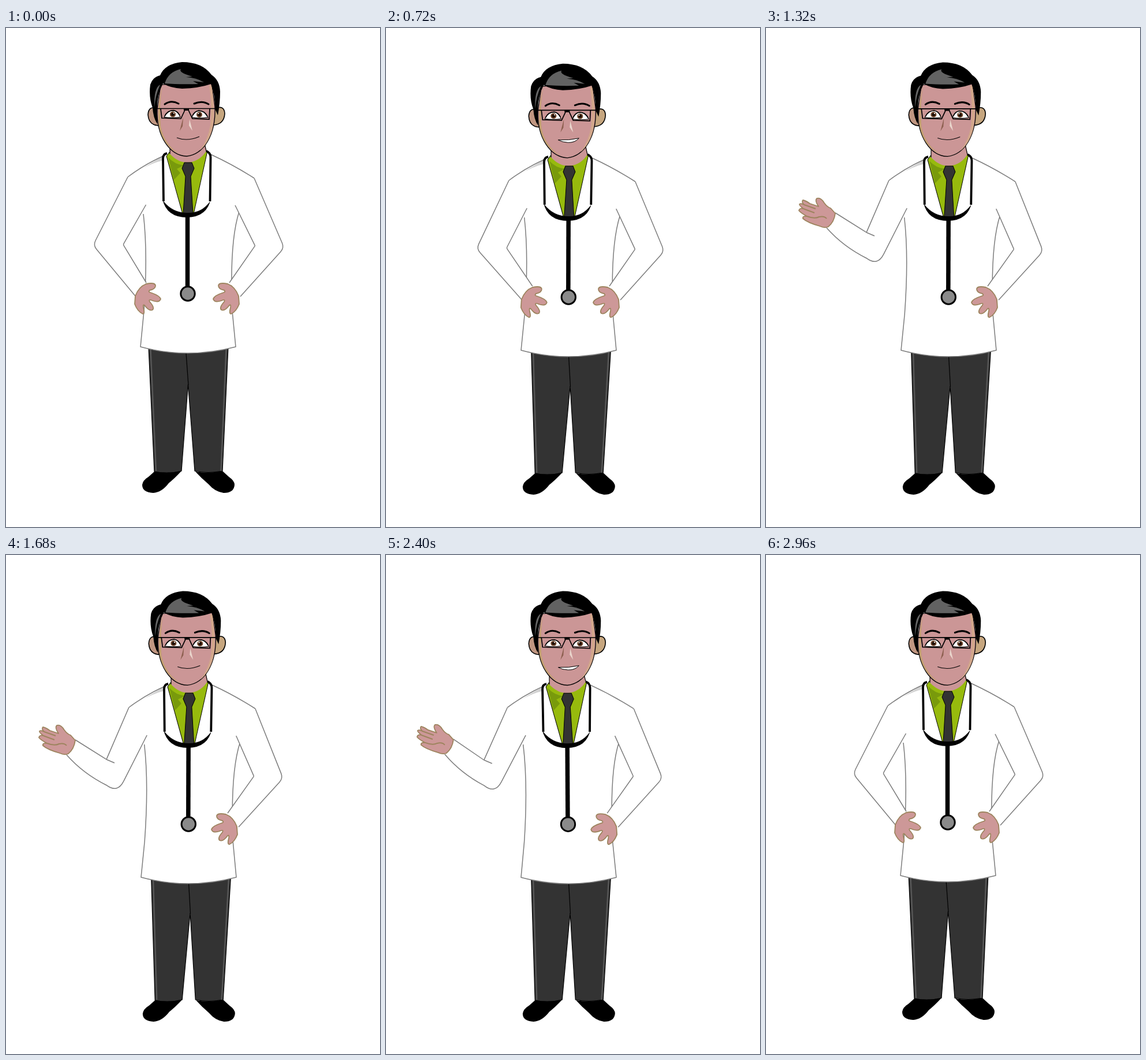
These frames come from a looping animation (648x864 px, 3000 ms). An HTML page:

```html
<!DOCTYPE html>
<html lang="en">
<head>
<meta charset="utf-8">
<title>Doctor</title>
<style>
  html, body { margin: 0; width: 100%; height: 100%; overflow: hidden; background: #fff; }
  svg { display: block; width: 100vw; height: 100vh; }
  .line { fill: none; stroke: #7c7c7c; stroke-width: 1.5; stroke-linejoin: round; }
  .ink { fill: none; stroke: #000; }
  .skin { fill: #cb9696; }
  .hand { fill: #cd9898; stroke: #9d845e; stroke-width: 1.8; stroke-linejoin: round; }
</style>
</head>
<body>
<svg viewBox="0 0 648 864">
  <defs>
    <path id="hip" class="hand" d="M224 464Q230 448 243 443Q258 440 259 446Q259 452 249 454Q246 457 250 458Q266 463 268 469Q266 477 251 471Q247 470 249 474Q258 484 254 488Q248 491 240 480Q237 478 238 484Q241 495 237 495Q228 491 223 478Z"/>
    <g id="eye">
      <path d="M-15 5Q-9-7 1-7Q9-6 13 5Q-1 7-15 5Z" fill="#fff" stroke="#000" stroke-width="1.1"/>
      <circle r="5" fill="#6e452b"/>
      <circle r="2.800" fill="#1a0d06"/>
      <circle cx="1.800" cy="-2" r="1.1" fill="#fff"/>
      <path class="ink" d="M-14 3Q-9-7 1-7Q8-6 12 2" stroke-width="1.7"/>
    </g>
  </defs>

  <g id="legs">
    <path d="M247 552L257 768Q281 773 304 767L315.500 617L327 767Q350 772 375 767L385 552Z" fill="#333" stroke="#000" stroke-width="1.2"/>
    <path d="M250.500 556L260 767M381.500 556L372.500 767" fill="none" stroke="#555" stroke-width="2.500"/>
    <path class="ink" d="M311.500 556L316 618" stroke-width="1.2"/>
    <path d="M257 768Q281 772 304 767Q292 780 282 788Q270 804 255 805Q236 804 236 791Q237 783 247 777Z"/>
    <path d="M328 768Q350 772 375 767L386 777Q396 784 396 791Q395 805 377 805Q362 803 351 790Q338 779 328 768Z"/>
  </g>

  <g id="torso">
    <path d="M211 258L272 221H355L430 260L404 318Q388 370 392 495L398 552Q315 574 233 552L239 495Q246 390 238 322Z" fill="#fff"/>
    <path d="M222 252L273 221V229Q248 235 222 252Z" fill="#d2d2d2"/>
    <path class="line" d="M211 258Q240 236 274 221M355 219Q394 237 430 260M238 322Q246 390 239 490L233 552Q315 574 398 552L392 490Q387 370 404 318"/>
    <path d="M283 215L278 222L306 322H325L349 213Z" fill="#97ba0d" stroke="#000"/>
    <path d="M281 224Q292 236 308 238L296 244L302 251L291 263Z" fill="#799a0c"/>
    <path class="skin" d="M284 190V218Q298 233 315 233Q336 231 347 213L343 190Z"/>
    <path class="ink" d="M284 198V218M343.500 198L347 213" stroke-width="1.2"/>
    <path d="M309 233H322L326 243L320 257L324 322H307L311 257L305 243Z" fill="#333" stroke="#000"/>
    <path class="ink" d="M279 217Q272 218 272 226L273 300M347 213Q354.500 216 354.500 224L353.500 300" stroke-width="3.800"/>
    <path d="M271 296Q278 328 314 328Q349 327 355 295L353 301Q338 321 314 320Q289 320 273 300Z"/>
    <path class="ink" d="M314.500 324V450" stroke-width="7.500"/>
    <circle cx="315" cy="460" r="12.200" fill="#8a8a8a" stroke="#000" stroke-width="3"/>
  </g>

  <g>
    <path id="sleeveL" fill="#fff"/><path id="seamL" class="line"/>
    <use id="hipL" href="#hip"/>
    <g id="open">
      <path class="hand" d="M120 321Q118 336 108 344Q102 347 93 343Q72 337 64 330Q63 325 71 326Q60 320 57 316Q58 311 65 313Q57 307 58 305Q61 303 66 306Q61 301 64 298Q69 299 76 304L91 309Q84 299 88 295Q95 293 101 303Q106 310 112 312Z" stroke-width="2.400"/>
      <path d="M71 326Q84 331 92 327Q101 325 105 330M65 313L84 320M66 306L86 313" fill="none" stroke="#9d845e" stroke-width="2"/>
    </g>
    <path id="sleeveR" fill="#fff"/><path id="seamR" class="line"/>
    <use id="hipR" href="#hip"/>
  </g>

  <g id="head">
    <g stroke="#000" stroke-width="1.6">
      <path d="M264 140Q247 133 246 150Q247 168 264 169Z" fill="#c09681"/>
      <path d="M360 140Q378 132 379 148Q378 167 359 168Z" fill="#c6a67f"/>
      <path class="skin" d="M268 98L262 140C260 188 284 221 313 222C342 219 364 186 362 136L356 94Z" stroke-width="1.3"/>
    </g>
    <path d="M271 100Q261 140 265 170Q272 205 302 219Q274 202 268 170Q265 130 271 100Z" fill="#c2a06e"/>
    <path d="M356 98Q363 140 358 173Q352 198 336 212Q350 193 354 168Q358 134 352 100Z" fill="#d2a78b"/>
    <path d="M262 166Q255 155 254 138Q247 120 250 98Q254 85 267 82Q275 62 305 59Q340 59 356 81Q370 90 371 110Q371 130 367 151L362 140Q362 115 355 97Q335 104 305 105Q285 104 272 96Q262 115 262 138Z"/>
    <path d="M275 96Q281 76 303 71Q298 77 323 84L312 85Q330 86 343 94L324 92L333 97Q300 98 275 96Z" fill="#626262"/>
    <path d="M267 98Q256 104 257 137Q259 116 267 98Z" fill="#666"/>
    <path class="ink" d="M275 132Q286 124 299 131M326 131Q340 125 351 132" stroke-width="3" stroke-linecap="round"/>
    <path d="M307 155L301 178L306 170Z" fill="#8c5f4f"/>
    <path d="M318 158L323 178L317 169Z" fill="#ead6cd"/>
    <use id="eyeL" href="#eye"/><use id="eyeR" href="#eye"/>
    <path class="ink" d="M258 139.500H368M268 140L270 156L303 157L310 142H316L323 157L352 158L353 140" stroke-width="1.7"/>
    <path class="ink" d="M308 141H317" stroke-width="4"/>
    <path id="smile" class="ink" d="M296 190Q314 197 335 188" stroke-width="1.1"/>
    <path id="grin" d="M297 191Q316 192 333 188Q326 196 314 195.500Q304 195 297 191Z" fill="#fff" stroke="#000"/>
  </g>
</svg>
<script>
const $ = id => document.getElementById(id);
const set = (id, name, value) => $(id).setAttribute(name, value);
const show = (id, on) => set(id, 'visibility', on ? 'visible' : 'hidden');

const clamp = x => Math.min(1, Math.max(0, x));
const ease = x => x * x * (3 - 2 * x);
const ramp = (t, a, b) => ease(clamp((t - a) / (b - a)));
const bump = (t, peak, reach) => Math.cos(Math.PI / 2 * clamp(Math.abs(t - peak) / reach)) ** 2;

const mix = (a, b, k) => a.map((v, i) => v + (b[i] - v) * k);
const add = (a, b) => [a[0] + b[0], a[1] + b[1]];
const sub = (a, b) => [a[0] - b[0], a[1] - b[1]];
const mid = (a, b) => mix(a, b, .5);
const polygon = points => `M${points.join('L')}Z`;

// How strongly each gesture acts at time t.
function gestures(t) {
  const step = ramp(t, 440, 680) * (1 - ramp(t, 2400, 2960));
  const settle = ramp(t, 320, 640);
  const flare = bump(t, 310, 220);
  const dip = bump(t, 2200, 220);
  return {
    step, settle, flare, dip,
    nod: bump(t, 1060, 400),
    pull: bump(t, 740, 220),
    sway: bump(t, 2160, 500),
    raise: ramp(t, 740, 1160) * (1 - ramp(t, 2440, 2860)),
    drop: 3 * settle + 3 * step - 3 * flare + 9 * dip
  };
}

// Shift the top and the bottom of a part by different amounts.
function lean(y0, y1, d0, d1, dy) {
  const slope = (d1 - d0) / (y1 - y0), shift = d0 - slope * y0;
  return {
    matrix: `matrix(1 0 ${slope} 1 ${shift} ${dy})`,
    at: ([x, y]) => [x + slope * y + shift, y + dy]
  };
}

function swing(a, b, k) {
  const angleA = Math.atan2(a[1], a[0]);
  let turn = Math.atan2(b[1], b[0]) - angleA;
  if (turn < 0) turn += 2 * Math.PI;
  const length = Math.hypot(...a) + (Math.hypot(...b) - Math.hypot(...a)) * k;
  const angle = angleA + turn * k;
  return [Math.cos(angle) * length, Math.sin(angle) * length];
}

// A bent seam with a rounded elbow and a slightly bowed forearm.
function bend(from, elbow, to, radius, bow = 0) {
  const toward = p => mix(elbow, p, Math.min(.45, radius / Math.hypot(...sub(p, elbow))));
  const start = toward(to), belly = add(mid(start, to), [-bow, bow]);
  return `M${from}L${toward(from)}Q${elbow} ${start}Q${belly} ${to}`;
}

function armPose([outer, inner, w0, w1], elbow, wrist) {
  const pose = [add(outer, elbow), add(inner, elbow), add(w0, wrist), add(w1, wrist)];
  const pivot = mid(pose[0], pose[1]);
  return { outer: pose[0], inner: pose[1], pivot, reach: [sub(pose[2], pivot), sub(pose[3], pivot)] };
}

function drawLeftArm(g, body) {
  const k = g.raise;
  const low = armPose([[151, 376], [203, 375], [224, 464], [243, 441]],
    [6 * g.pull - 17 * g.flare, g.drop], [11 * g.pull - 3 * g.flare, g.drop - 9 * g.flare]);
  const high = armPose([[174, 354], [193, 413], [120, 320], [105, 346]],
    [-8 * g.sway, 2 * g.sway], [-6 * g.sway, -2 * g.sway]);
  const outer = mix(low.outer, high.outer, k), inner = mix(low.inner, high.inner, k);
  const [w0, w1] = low.reach.map((r, i) => add(mid(outer, inner), swing(r, high.reach[i], k)));
  const shoulder = body.at([211, 258]), armpit = body.at([242.5, 306]);

  set('sleeveL', 'd', polygon([shoulder, outer, w0, w1, inner, armpit]));
  set('seamL', 'd', bend(shoulder, outer, w0, 9 - 8 * k) +
    bend(armpit, inner, w1, 2 + 22 * k, 6 * k) +
    `M${outer}L${add(outer, [14 * k, 6 * k])}`);

  const place = (x, y, angle) =>
    `translate(${mid(w0, w1)}) rotate(${angle}) translate(${-x} ${-y})`;
  set('hipL', 'transform', place(233.5, 452.5, 158 * k));
  set('open', 'transform', place(112.5, 333, 158 * (k - 1)));
  show('hipL', k < .5);
  show('open', k >= .5);
}

function drawRightArm(g, body) {
  const elbow = [14 * g.flare - 2 * g.raise - 2 * g.sway, g.drop];
  const wrist = [-9 * g.flare - 3 * g.raise - 1.5 * g.sway, g.drop - 18 * g.flare];
  const outer = add([482, 380.5], elbow), inner = add([431.5, 377], elbow);
  const w0 = add([406, 465], wrist), w1 = add([387, 441], wrist);
  const shoulder = body.at([430, 260]), armpit = body.at([397, 307]);

  set('sleeveR', 'd', polygon([shoulder, outer, w0, w1, inner, armpit]));
  set('seamR', 'd', bend(shoulder, outer, w0, 9) + bend(armpit, inner, w1, 1));
  set('hipR', 'transform', `translate(${627 + wrist[0]} ${wrist[1]}) scale(-1 1)`);
}

function drawHead(t, g) {
  const y = 3.4 * g.settle - 4 * g.flare - 11 * g.nod + 5 * g.dip;
  set('head', 'transform', `translate(${1.3 * g.settle - g.flare} ${y})`);

  const lid = .98 - .16 * g.sway - .3 * g.flare;
  set('eyeL', 'transform', `translate(289 149.5) scale(1 ${lid})`);
  set('eyeR', 'transform', `translate(335 150) scale(-1 ${lid})`);

  const talking = t >= 280 && t < 1000 || t >= 1720 && t < 2640;
  show('smile', !talking);
  show('grin', talking);
}

function draw(time) {
  const t = Math.floor(time % 3000 / 40) * 40;
  const g = gestures(t < 120 ? 0 : t);
  const body = lean(220, 555, 2 * g.step - 5.5 * g.sway - 5 * g.flare, g.step, g.drop);
  set('torso', 'transform', body.matrix);
  set('legs', 'transform', lean(556, 768, 4.5 * g.step, 1.2 * g.step, 3 * g.step).matrix);
  drawLeftArm(g, body);
  drawRightArm(g, body);
  drawHead(t, g);
}

let start;
function tick(now) {
  start ??= now;
  draw(now - start);
  requestAnimationFrame(tick);
}
draw(0);
requestAnimationFrame(tick);
</script>
</body>
</html>
```
